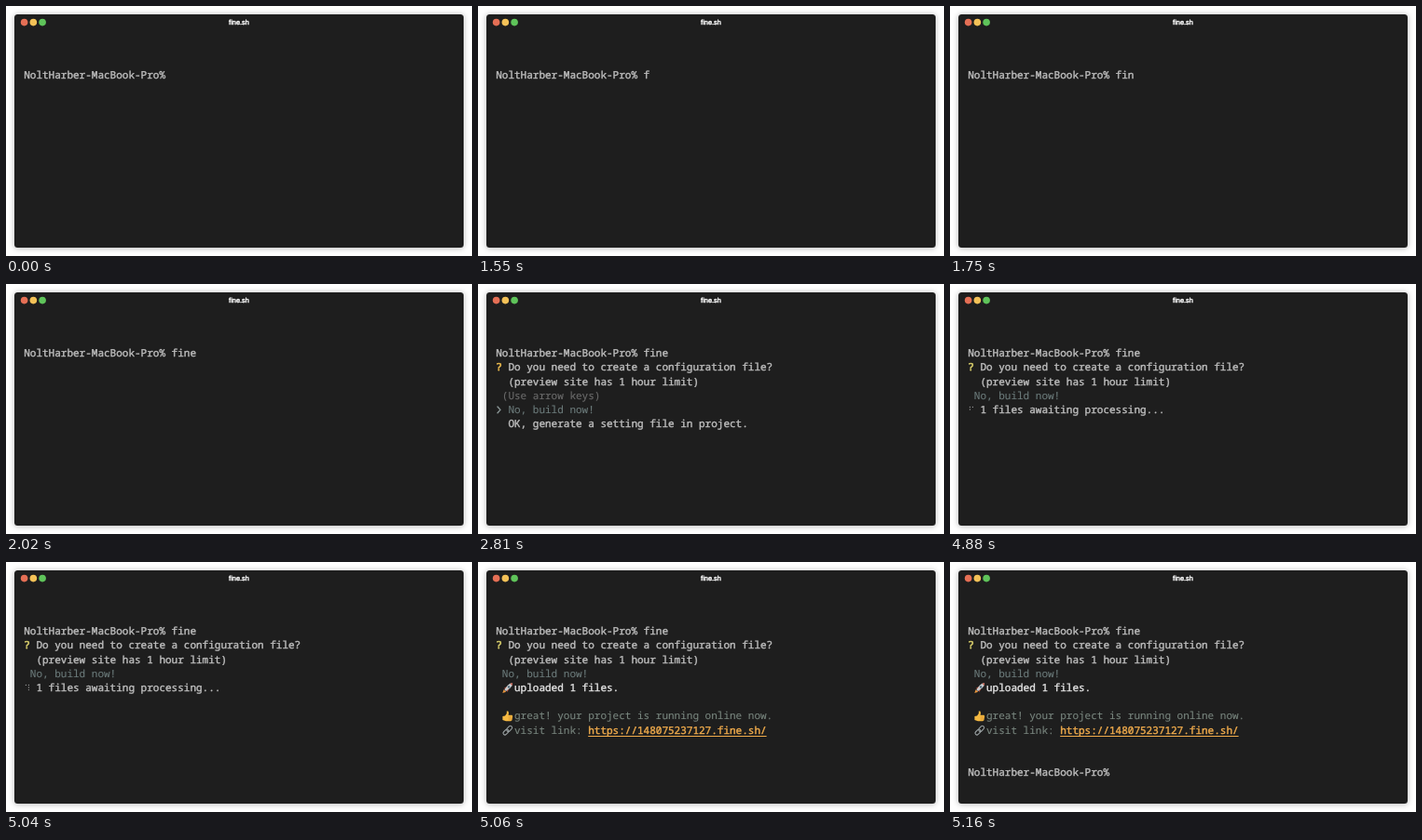
Animation, 500 px wide and 269 px high, one loop 7.55 s. Source, as an HTML page with a canvas:

```html
<!DOCTYPE html>
<html lang="en">
<head>
<meta charset="utf-8">
<title>Terminal</title>
<style>
  html, body { margin: 0; width: 100%; height: 100%; overflow: hidden; background: #fff; }
  canvas { display: block; width: 500px; height: 269px; }
</style>
</head>
<body>
<canvas id="stage"></canvas>
<script>
const W = 500, H = 269, LOOP = 7550;
const FONT_SIZE = 11, CELL = FONT_SIZE * 0.6, LINE = 15.2;
const LEFT = 19.2, BASELINE = 78.2;
const PROMPT = 'NoltHarber-MacBook-Pro%';
const COLOR = {
  text: '#bebebe', bright: '#e2e2e2', dim: '#6c6c6c', choice: '#6c7b7b',
  note: '#79867f', ask: '#efbd4e', asked: '#d9cf6c', link: '#f0ab4c'
};
// Extra stroke around the glyphs
const WEIGHT = { light: 0.1, normal: 0.4, heavy: 0.6 };
// Braille dots as [column, row] in a 2 x 3 cell
const SPINNER = [
  [[0, 0], [0, 1], [1, 0]],
  [[0, 0], [1, 0], [1, 1]],
  [[0, 0], [1, 0], [1, 1], [1, 2]]
];

const canvas = document.getElementById('stage');
const ratio = window.devicePixelRatio || 1;
canvas.width = W * ratio;
canvas.height = H * ratio;
const ctx = canvas.getContext('2d');
ctx.scale(ratio, ratio);
ctx.textRendering = 'geometricPrecision';
ctx.lineCap = ctx.lineJoin = 'round';

const colX = col => LEFT + col * CELL;
const rowY = row => BASELINE + row * LINE;

function disc(x, y, r, color) {
  ctx.fillStyle = color;
  ctx.beginPath();
  ctx.arc(x, y, r, 0, Math.PI * 2);
  ctx.fill();
}

function shape(color, points) {
  ctx.fillStyle = color;
  ctx.beginPath();
  points.forEach(([x, y]) => ctx.lineTo(x, y));
  ctx.closePath();
  ctx.fill();
}

function pill(x, y, w, h, r) {
  ctx.beginPath();
  ctx.roundRect(x, y, w, h, r);
}

function inkText(text, x, y, color, weight) {
  ctx.fillStyle = ctx.strokeStyle = color;
  ctx.lineWidth = weight;
  ctx.fillText(text, x, y);
  ctx.strokeText(text, x, y);
}

function print(row, col, text, color = COLOR.text, weight = WEIGHT.normal) {
  ctx.font = `${FONT_SIZE}px "Noto Sans Mono", "DejaVu Sans Mono", monospace`;
  ctx.textAlign = 'left';
  inkText(text, colX(col), rowY(row), color, weight);
}

function drawWindow() {
  ctx.fillStyle = '#fff';
  ctx.fillRect(0, 0, W, H);
  ctx.save();
  ctx.shadowColor = 'rgba(0, 0, 0, 0.3)';
  ctx.shadowBlur = 6 * ratio;
  ctx.shadowOffsetY = 0.5 * ratio;
  ctx.fillStyle = '#1e1e1e';
  pill(9, 9, 482, 251, 3.5);
  ctx.fill();
  ctx.restore();

  ['#e56f55', '#f3c157', '#5fc45a'].forEach((color, i) => disc(19.6 + i * 9.75, 17.6, 3.8, color));

  ctx.font = '7.4px "Liberation Sans", Arial, sans-serif';
  ctx.textAlign = 'center';
  inkText('fine.sh', 250, 20.3, '#f8f8f8', 0.45);
}

// Draws an icon in a 12 x 12 box at the second column
function icon(row, draw) {
  ctx.save();
  ctx.translate(colX(1), rowY(row) - 9.4);
  draw();
  ctx.restore();
}

function rocket() {
  shape('#e8943c', [[0.5, 11.5], [1.8, 7.6], [4.4, 10.2]]);
  shape('#b8523f', [[2, 6.5], [5, 4.4], [7.6, 7], [5.6, 10.4], [4.8, 8]]);
  shape('#c9ced1', [[2.6, 8], [6, 3.2], [8.6, 1.2], [11.3, 0.7], [10.8, 3.4], [8.8, 6], [4.2, 9.5]]);
  shape('#c75a48', [[8.6, 1.2], [11.3, 0.7], [10.8, 3.4]]);
  disc(7.3, 4.8, 1.2, '#486676');
}

function thumb() {
  shape('#f5b941', [[0.6, 6], [3.2, 5.4], [5, 3], [5, 0.6], [6.6, 0.5], [7.2, 2.2],
    [6.8, 4.8], [10.8, 4.8], [11.4, 6], [10.6, 10.2], [9.4, 11.3], [4.2, 11.2], [0.6, 10]]);
  ctx.strokeStyle = '#cd8630';
  ctx.lineWidth = 0.5;
  ctx.beginPath();
  [6.6, 8.2, 9.8].forEach(y => { ctx.moveTo(7.2, y); ctx.lineTo(10.6, y); });
  ctx.stroke();
}

function chain() {
  ctx.translate(6, 6);
  ctx.rotate(-Math.PI / 4);
  ctx.strokeStyle = '#99a0a2';
  ctx.lineWidth = 1.1;
  [-6, -0.8].forEach(x => {
    pill(x, -1.9, 6.8, 3.8, 1.9);
    ctx.stroke();
  });
}

function drawQuestion(color) {
  print(1, 0, '?', color, WEIGHT.heavy);
  print(1, 2, 'Do you need to create a configuration file?');
  print(2, 2, '(preview site has 1 hour limit)');
}

function drawMenu() {
  drawQuestion(COLOR.ask);
  print(3, 1, '(Use arrow keys)', COLOR.dim, WEIGHT.light);
  print(4, 2, 'No, build now!', COLOR.choice, WEIGHT.light);
  print(5, 2, 'OK, generate a setting file in project.');
  const y = rowY(4) - 3.6;
  ctx.strokeStyle = '#8a9696';
  ctx.lineWidth = 1.4;
  ctx.beginPath();
  ctx.moveTo(21, y - 3.4);
  ctx.lineTo(24, y);
  ctx.lineTo(21, y + 3.4);
  ctx.stroke();
}

function drawSpinner(step) {
  SPINNER[step].forEach(([x, y]) => disc(21.4 + x * 3, rowY(4) - 6.6 + y * 2.6, 0.65, '#9a9a9a'));
  print(4, 2, '1 files awaiting processing...');
}

function drawResult() {
  const link = 'https://148075237127.fine.sh/';
  icon(4, rocket);
  print(4, 3, 'uploaded 1 files.', COLOR.bright);
  icon(6, thumb);
  print(6, 3, 'great! your project is running online now.', COLOR.note, WEIGHT.light);
  icon(7, chain);
  print(7, 3, 'visit link:', COLOR.note, WEIGHT.light);
  print(7, 15, link, COLOR.link);
  ctx.fillRect(colX(15), rowY(7) + 2.4, link.length * CELL, 1);
}

function render(t) {
  drawWindow();
  const typed = [1550, 1700, 1750, 2020].filter(at => t >= at).length;
  print(0, 0, `${PROMPT} ${'fine'.slice(0, typed)}`);
  if (t < 2810) return;
  if (t < 4650) return drawMenu();

  drawQuestion(COLOR.asked);
  print(3, 1, 'No, build now!', COLOR.choice, WEIGHT.light);
  if (t >= 5060) drawResult();
  else if (t >= 4880) drawSpinner(Math.floor((t - 4880) / 80));
  if (t >= 5160) print(10, 0, PROMPT);
}

const start = performance.now();
function tick() {
  render((performance.now() - start) % LOOP);
  requestAnimationFrame(tick);
}
tick();
</script>
</body>
</html>
```
